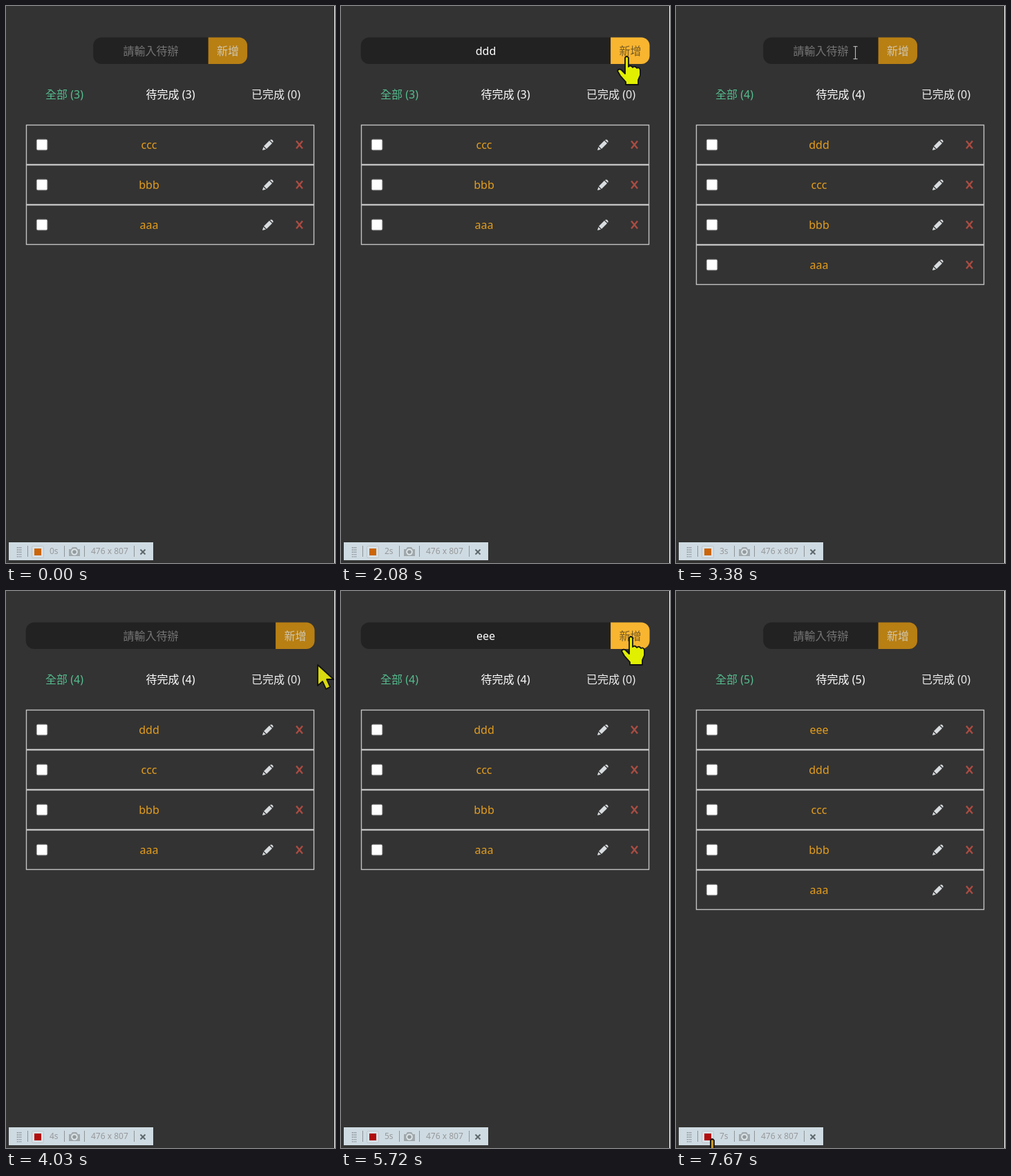
These frames come from a looping animation (476x807 px, 7800 ms). An HTML page:

```html
<!DOCTYPE html>
<html lang="zh-Hant">
<head>
<meta charset="utf-8">
<title>待辦</title>
<style>
  html, body { margin: 0; width: 100%; height: 100%; overflow: hidden; background: #333; }
  svg { display: block; width: 476px; height: 807px; }
  text { font: 16px "Noto Sans", "Noto Sans CJK TC", "Noto Sans CJK", sans-serif; text-anchor: middle; }
  .line { fill: none; stroke: #c2c2c2; stroke-width: 1.4; }
  .item { fill: #e39d1d; font-weight: 500; }
  .check { fill: #fff; stroke: #959595; }
  .pen { fill: #d8dcdf; }
  .del { fill: none; stroke: #a94c42; stroke-width: 2.4; }
  #bar text { font-size: 12px; fill: #96999b; text-anchor: start; }
  #arrow, #hand { stroke: #111; stroke-width: 1.8; stroke-linejoin: round; }
  #beam { fill: none; stroke: #ccc; }
</style>
</head>
<body>
<svg viewBox="0 0 476 807">
  <rect width="476" height="807" fill="#333"/>
  <rect x="475" width="1" height="807" fill="#fff"/>

  <path id="field" fill="#222"/>
  <text id="value" x="209.5" y="71"></text>
  <path id="caret" d="M210.5 55v20" stroke="#ddd"/>
  <g id="add">
    <path id="addBg" d="M0 45.500h44.400a12 12 0 0 1 12 12v14.500a12 12 0 0 1-12 12h-44.400z"/>
    <text id="addText" x="28.300" y="71">新增</text>
  </g>

  <text id="all" x="84.500" y="134" fill="#55bd8f"></text>
  <text id="todo" x="238" y="134" fill="#fff"></text>
  <text x="390.500" y="134" fill="#eee">已完成 (0)</text>

  <g id="list"></g>

  <g id="bar">
    <rect x="4" y="777" width="209" height="26" fill="#cfdbe2"/>
    <path d="M16.500 784v15M19 784v15M21.500 784v15" stroke="#777e83" stroke-width="1.300" stroke-dasharray="1.400 1.900"/>
    <path d="M31.500 782v16M84.500 782v16M113.500 782v16M185.500 782v16" stroke="#8d9498"/>
    <rect x="37.500" y="782.500" width="17" height="17" rx="2" fill="#d6e0e5" stroke="#bcc6cb"/>
    <rect id="rec" x="41" y="786" width="10" height="10"/>
    <text id="secs" x="63" y="794"></text>
    <path d="M91 787h3l2-3h6l2 3h3v10H91z" fill="#a0a8ac"/>
    <circle cx="99" cy="791" r="3.800" fill="#949b9f" stroke="#dde5e9" stroke-width="2"/>
    <text x="123" y="794">476 x 807</text>
    <path d="M194.500 787.500l7 7m0-7l-7 7" stroke="#5d686c" stroke-width="2"/>
  </g>

  <g id="cursor">
    <path id="arrow" fill="#d9d910" d="M0 0V30L7 24 12 35 18 32 13 21H23Z"/>
    <path id="hand" d="M-2 2Q0-2 3 2V15Q6 12 9 16 12 13 15 17 19 15 20 20V27L17 34V41H-1V37L-9 28-13 21Q-11 17-7 20L-2 25Z"/>
    <path id="beam" d="M-3-9H3M0-9V9M-3 9H3"/>
  </g>
</svg>

<script>
const LOOP = 7800, STEP = 130, SLIDE = 500, RESIZE = 260;
const $ = id => document.getElementById(id);
const put = (el, attrs) => { for (const k in attrs) el.setAttribute(k, attrs[k]); };
const clamp = x => Math.min(1, Math.max(0, x));

// Two rounds of: focus the field, type, press the button
const rounds = [
  { focus: 780, keys: [1300, 1430, 1560], char: 'd', add: 2383 },
  { focus: 3500, keys: [4550, 4680, 4940], char: 'e', add: 5780 }
];

// time, x, y
const path = [
  [130, 60, 758], [650, 250, 65], [780, 250, 65], [1040, 391, 103], [1170, 391, 103],
  [1560, 436, 96], [1820, 436, 96], [2210, 405, 65], [2383, 405, 65], [2730, 333, 88],
  [3120, 333, 88], [3450, 250, 65], [3540, 250, 65], [4030, 451, 107], [4810, 453, 18],
  [5070, 453, 18], [5460, 419, 66], [7020, 419, 66], [7200, 432, 150], [7670, 52, 794]
];

// start time, pointer kind
const kinds = [
  [0, ''], [130, 'arrow'], [580, 'beam'], [880, 'arrow'], [2080, 'hand'], [2383, 'arrow'],
  [3350, 'beam'], [3700, 'arrow'], [5300, 'hand'], [7100, 'arrow'], [7600, 'hand']
];

// CSS "ease", solved by bisection
function ease(x) {
  x = clamp(x);
  let lo = 0, hi = 1, u = x;
  for (let i = 0; i < 24; i++) {
    u = (lo + hi) / 2;
    if (.75 * u * (1 - u) + u ** 3 < x) lo = u; else hi = u;
  }
  return .3 * u * (1 - u) ** 2 + 3 * u * u * (1 - u) + u ** 3;
}

const rows = ['aaa', 'bbb', 'ccc', 'ddd', 'eee'].map((name, i) => {
  const g = document.createElementNS('http://www.w3.org/2000/svg', 'g');
  g.innerHTML = `
    <rect class="line" x=".5" y=".5" width="416" height="57"/>
    <rect class="check" x="15.300" y="21.300" width="15.500" height="15.500" rx="2"/>
    <text class="item" x="178" y="35">${name}</text>
    <path class="pen" transform="translate(342 21)"
      d="M0 16L1.300 11.200 5 14.800ZM2 10L10 2 14 6 6 14ZM11 1.200Q12.800-.5 14.800 1.400 16.600 3.300 15 5Z"/>
    <path class="del" d="M391 23.500L400 34.500M400 23.500L391 34.500"/>`;
  $('list').append(g);
  return { g, born: i < 3 ? -LOOP : rounds[i - 3].add };
});

function pointerAt(t) {
  const i = path.findIndex(p => p[0] > t);
  if (i < 0) return path[path.length - 1].slice(1);
  if (i === 0) return path[0].slice(1);
  const [a, b] = [path[i - 1], path[i]];
  const k = (t - a[0]) / (b[0] - a[0]), s = k * k * (3 - 2 * k);
  return [a[1] + (b[1] - a[1]) * s, a[2] + (b[2] - a[2]) * s];
}

function drawField(t, hover) {
  const round = rounds.find(r => t >= r.focus && t < r.add);
  const open = rounds.reduce((sum, r) =>
    sum + ease((t - r.focus) / RESIZE) - ease((t - r.add) / RESIZE), 0);
  const left = 126.2 - 97.5 * open, right = 292.7 + 97.4 * open;
  put($('field'), { d: `M${right} 45.500H${left + 12}a12 12 0 0 0-12 12v14.500a12 12 0 0 0 12 12H${right}z` });
  put($('add'), { transform: `translate(${right} 0)` });
  put($('addBg'), { fill: hover ? '#f8b530' : '#b87f13' });
  put($('addText'), { fill: hover ? '#755a24' : '#cfc7b2' });

  const typed = round ? round.keys.filter(k => t >= k) : [];
  $('value').textContent = typed.length ? round.char.repeat(typed.length) : '請輸入待辦';
  put($('value'), { fill: typed.length ? '#fff' : '#757575' });

  const active = round && (typed.length ? typed[typed.length - 1] : round.focus);
  const end = $('value').getComputedTextLength() / 2;
  put($('caret'), {
    visibility: round && (t - active) % 1000 < 500 ? 'visible' : 'hidden',
    transform: `translate(${typed.length ? Math.round(end) : 0} 0)`
  });
}

function drawList(t) {
  const shown = rows.filter(r => t >= r.born);
  rows.forEach((r, i) => {
    const k = ease((t - r.born) / SLIDE);
    const y = 172 + 58 * (shown.length - 1 - i);
    put(r.g, {
      visibility: t >= r.born ? 'visible' : 'hidden',
      opacity: k,
      transform: `translate(${Math.round(29 - 417 * (1 - k))} ${y})`
    });
  });
  $('all').textContent = `全部 (${shown.length})`;
  $('todo').textContent = `待完成 (${shown.length})`;
}

function draw(t) {
  const kind = kinds.filter(k => k[0] <= t).pop()[1];
  const [x, y] = pointerAt(t);
  drawField(t, kind === 'hand' && rounds.some(r => t >= r.focus && t < r.add));
  drawList(t);

  $('secs').textContent = Math.floor(t / 1000) + 's';
  put($('rec'), { fill: (t + 120) % 1050 < 380 ? '#cb6508' : '#b00c0c' });

  put($('cursor'), { transform: `translate(${x.toFixed(1)} ${y.toFixed(1)})` });
  for (const id of ['arrow', 'hand', 'beam'])
    put($(id), { visibility: id === kind ? 'visible' : 'hidden' });
  put($('hand'), { fill: t > 7600 ? '#c9991f' : '#e0f000' });
}

let start;
function tick(now) {
  start ??= now;
  draw(Math.floor((now - start) % LOOP / STEP) * STEP);
  requestAnimationFrame(tick);
}
draw(0);
requestAnimationFrame(tick);
</script>
</body>
</html>
```
